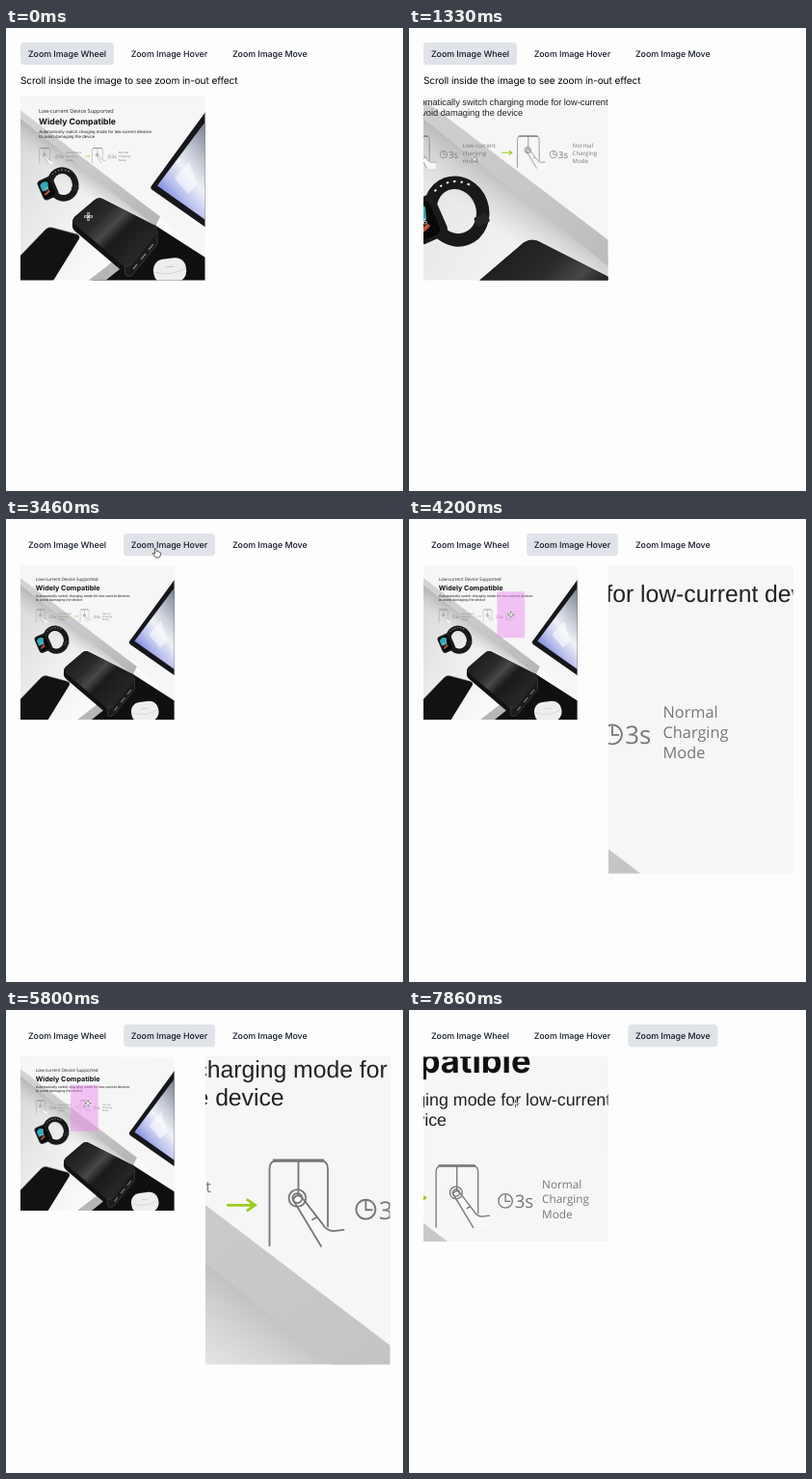
Animation, 412 px wide and 480 px high, one loop 8 s. Source, as an HTML page:

```html
<!DOCTYPE html>
<html lang="en">
<head>
<meta charset="utf-8">
<title>Zoom image demo</title>
<style>
  html, body { margin: 0; width: 100%; height: 100%; overflow: hidden; background: #fdfdfd; }
  #stage { display: block; width: 412px; height: 480px; text-rendering: geometricPrecision; }
  .tab { fill: #e0e3e8; }
  .label { font: 500 8.85px Inter, sans-serif; letter-spacing: -.005em; fill: #111827; }
  .hint { font: 10.08px Inter, sans-serif; letter-spacing: -.01em; fill: #000; }
  .small { font: 2.94px "Open Sans", sans-serif; fill: #777; }
  .body { font: 4.47px "Liberation Sans", Arial, sans-serif; fill: #222; }
  .line { fill: none; stroke: #777; stroke-width: .33; }
</style>
</head>
<body>
<svg id="stage" viewBox="0 0 412 480">
  <defs>
    <linearGradient id="desk" x2="1" y2=".6">
      <stop stop-color="#d2d2d3"/><stop offset=".35" stop-color="#e9e9ea"/><stop offset=".7" stop-color="#fafafa"/>
    </linearGradient>
    <linearGradient id="ledge" x2="1" y2="1">
      <stop stop-color="#d4d4d4"/><stop offset=".6" stop-color="#c6c6c6"/><stop offset="1" stop-color="#b4b4b4"/>
    </linearGradient>
    <linearGradient id="shade" gradientUnits="userSpaceOnUse" x1="70" y1="76" x2="55" y2="96">
      <stop stop-color="#a8a8a8" stop-opacity=".75"/><stop offset="1" stop-color="#c8c8c8" stop-opacity="0"/>
    </linearGradient>
    <linearGradient id="screen" x1=".9" x2=".3" y2="1">
      <stop stop-color="#7d8693"/><stop offset=".3" stop-color="#c3c9d4"/><stop offset=".5" stop-color="#f0f1f6"/>
      <stop offset=".72" stop-color="#b9c0ee"/><stop offset="1" stop-color="#5a66cf"/>
    </linearGradient>
    <linearGradient id="shell" x2="1" y2=".8">
      <stop stop-color="#161616"/><stop offset=".35" stop-color="#2b2b2b"/><stop offset=".48" stop-color="#484848"/><stop offset=".6" stop-color="#1b1b1b"/><stop offset="1" stop-color="#2c2c2c"/>
    </linearGradient>

    <g id="step">
      <path class="line" d="M74.4 70.5V56q0-1.5 1.5-1.5h7.9q1.5 0 1.5 1.5V68M79.8 54.5V61"/>
      <path d="M75 54.5h9.6" stroke="#777" stroke-width=".6"/>
      <path d="M78.8 61.8q.8-1.6 2 0l3.6 4.9 4 .9v3.2h-4.2z" fill="#f8f8f8"/>
      <path class="line" d="M84.1 70.6l-5.3-8.8q.8-1.6 2 0l3.4 4.4q1 1.7 2.6 1.4l1.6-.2M82.3 65.6l.9-.5"/>
      <circle class="line" cx="79.6" cy="61.5" r="1.6"/><circle class="line" cx="79.6" cy="61.5" r=".9"/>
      <circle class="line" cx="92.4" cy="63.6" r="1.8"/><path class="line" d="M92.4 62v1.7h1.3"/>
      <text class="small" x="94.8" y="65.4" style="font-size:4.65px">3s</text>
    </g>

    <g id="art">
      <rect width="192" height="192" fill="url(#desk)"/>
      <path d="M0 20L140 130l-30 40L0 85z" fill="url(#shade)"/>
      <path d="M0 0H192V170L143 124 0 15.4z" fill="#f6f6f7"/>
      <path d="M0 15.4L145 125.5l-5 10L0 24z" fill="url(#ledge)"/>
      <path d="M139 134l53 34v24H74z" fill="#101011"/>
      <path d="M70 192l38-29 10 5-30 24z" fill="#b6b6b7"/>

      <path d="M136 93.5L192 17v119.5l-55-38.5q-3-2-1-4.5z" fill="#16171a"/>
      <path d="M142 93.5L192 27v102z" fill="url(#screen)"/>
      <path d="M160 86l15-17 8 24-9 9z" fill="#fff" opacity=".55"/>

      <text x="19" y="18.3" style="font:5.5px 'Open Sans',sans-serif" fill="#222">Low-current Device Supported</text>
      <text x="19" y="30.4" style="font:700 8.65px Inter,sans-serif" fill="#111">Widely Compatible</text>
      <text class="body" x="19.2" y="38.9">Automatically switch charging mode for low-current devices</text>
      <text class="body" x="19.2" y="44.2">to avoid damaging the device</text>
      <use href="#step" x="-54.8"/><use href="#step"/>
      <g class="small">
        <text x="47" y="60.4">Low-current</text><text x="47" y="64.2">charging</text><text x="47" y="68">mode</text>
        <text x="101.9" y="60.4">Normal</text><text x="101.9" y="64.2">Charging</text><text x="101.9" y="68">Mode</text>
      </g>
      <path d="M66.4 62.8h5.2m-1.5-1.1 1.6 1.1-1.6 1.1" fill="none" stroke="#9ccc1f" stroke-width=".5"/>

      <ellipse cx="44" cy="92" rx="13" ry="14.5" fill="none" stroke="#19191a" stroke-width="6.5" transform="rotate(-20 44 92)"/>
      <path d="M33 82q8-8 18-3" fill="none" stroke="#e8e8e8" stroke-width="1" stroke-dasharray="1.2 2.4"/>
      <rect x="53" y="94" width="7" height="5" rx="1" fill="#252526" transform="rotate(-25 56 96)"/>
      <g transform="rotate(-24 29 96)">
        <rect x="20" y="85" width="17" height="22" rx="4" fill="#1a1b1d"/>
        <rect x="21.5" y="87" width="12" height="18" rx="3" fill="#070809"/>
        <path d="M22 90q5-4 9 0l-2 6-7 1z" fill="#36a9b7"/>
        <path d="M23 101l6-2" stroke="#c75442" stroke-width="2"/>
        <text x="24" y="98" fill="#fff" style="font:4px Inter,sans-serif">08</text>
      </g>

      <path d="M0 166l26-27q3-3 7-2l26 7q4 2 1 6L34 192H0z" fill="#121214"/>
      <path d="M0 166l26-27q3-3 7-2l26 7" fill="none" stroke="#555" stroke-width=".6"/>

      <path d="M56 126l20-17q4-4 9-2l55 28q4 2 3 6l-1 14q0 3-3 5l-22 24q-4 4-8 1L57 141q-4-3-3-9 0-4 2-6z" fill="#111"/>
      <path d="M56 126l20-17q4-4 9-2l55 28q4 2 0 6l-26 34q-4 4-8 1L56 133q-3-3 0-7z" fill="url(#shell)"/>
      <path d="M108 177q4 1 7-2l27-35v14l-25 31q-4 4-8 1z" fill="#1b1b1c" stroke="#555" stroke-width=".6"/>
      <path d="M117 180l4-5m4-5 5-6m3-4 5-6" stroke="#777" stroke-width="1.5"/>

      <g transform="rotate(-7 155 181)">
        <rect x="138" y="169" width="34" height="25" rx="11" fill="#eeeeef"/>
        <path d="M139 181q16 7 32 0" fill="none" stroke="#c4c4c6" stroke-width=".6"/>
        <rect x="151" y="177" width="9" height="1" fill="#c8c8ca"/>
      </g>
    </g>
  </defs>

  <rect width="412" height="480" fill="#fdfdfd"/>
  <rect class="tab" x="15" y="15" width="97" height="23.3" rx="4"/>
  <rect class="tab" x="122" y="15" width="95" height="23.3" rx="4"/>
  <rect class="tab" x="227.3" y="15" width="93" height="23.3" rx="4"/>
  <g class="label">
    <text x="23" y="30">Zoom Image Wheel</text>
    <text x="129.7" y="30">Zoom Image Hover</text>
    <text x="235" y="30">Zoom Image Move</text>
  </g>
  <text class="hint" id="hint" x="15" y="58.4">Scroll inside the image to see zoom in-out effect</text>
  <svg id="photo" x="15"><use href="#art"/></svg>
  <rect id="lens" width="28.7" height="47.9" fill="#ee82ee" opacity=".45"/>
  <svg id="panel" x="207" y="48.5" width="191.5" height="319"><use href="#art"/></svg>

  <g id="cross" fill="none">
    <path d="M-4.5 0h9M0-4.5v9" stroke="#fff" stroke-width="2"/>
    <path d="M-4 0h3M1 0h3M0-4v3M0 1v3" stroke="#333" stroke-width=".8"/>
  </g>
  <path id="hand" d="M-1.8-4.5q1-.8 1.6.4l.6 2.6q1.2-.6 1.8.4 1.1-.4 1.4.6 1-.1 1 1.1l-.4 2.2-1 2h-4l-2.6-3.4q-.8-1.3.6-1.2l1.5 1z" fill="#fff" stroke="#333" stroke-width=".8"/>
</svg>

<script>
  const LOOP = 8000, SIZE = 191.5, SMALL = 159.6, LEFT = 15, TOP = 48.5;
  const RATIO = SIZE / SMALL, LENS_W = 28.7, LENS_H = 47.9, LENS_LAG = 60;
  const HOVER_AT = 2540, MOVE_AT = 6400;

  // Pointer path: time, x, y
  const path = [
    [0, 85.5, 195.5], [1000, 85.5, 195.5], [1130, 68, 136], [2000, 68, 136],
    [2200, 156, 35], [3460, 156, 35], [4130, 105.8, 99.2], [4530, 105.8, 99.2],
    [4730, 170, 34], [4930, 170, 34], [5530, 81.4, 101.7], [5799, 81.4, 101.7],
    [5800, 85, 97], [6100, 130, 34], [6330, 263, 29], [7130, 263, 29],
    [7860, 110.5, 97], [LOOP, 110.5, 97]
  ];

  const el = id => document.getElementById(id);
  const tabs = document.querySelectorAll('.tab');
  const [hint, photo, lens, panel, cross, hand] =
    ['hint', 'photo', 'lens', 'panel', 'cross', 'hand'].map(el);

  const clamp = (v, lo, hi) => Math.min(hi, Math.max(lo, v));
  const show = (node, on) => node.setAttribute('visibility', on ? 'visible' : 'hidden');
  const set = (node, attrs) => {
    for (const key in attrs) node.setAttribute(key, attrs[key]);
  };

  function pointerAt(time) {
    const t = clamp(time, 0, LOOP - 1);
    const i = path.findIndex(p => p[0] > t);
    const [t0, x0, y0] = path[i - 1], [t1, x1, y1] = path[i];
    const k = (t - t0) / (t1 - t0);
    return { x: x0 + (x1 - x0) * k, y: y0 + (y1 - y0) * k };
  }

  function place(top, size, scale = 1, x = 0, y = 0) {
    const span = SIZE / scale;
    set(photo, { y: top, width: size, height: size, viewBox: `${x / scale} ${y / scale} ${span} ${span}` });
  }

  function wheel(t) {
    const scale = clamp(Math.exp((t - 1130) * 0.00364), 1, 4);
    place(70, SIZE, scale, 53 * (scale - 1), 66 * (scale - 1));
    return true;
  }

  function hover(t, pointer) {
    const within = p => p.y > TOP && p.x < LEFT + SMALL;
    // The enlarged view keeps its last position while the pointer is away.
    const focus = pointerAt(t > 4530 && t < 5080 ? 4500 : t - LENS_LAG);
    const x = clamp(focus.x - LENS_W / 2, LEFT, LEFT + SMALL - LENS_W);
    const y = clamp(focus.y - LENS_H / 2, TOP, TOP + SMALL - LENS_H);
    const inside = within(pointer);
    place(TOP, SMALL);
    set(lens, { x, y });
    set(panel, { viewBox: [(x - LEFT) * RATIO, (y - TOP) * RATIO, LENS_W * RATIO, LENS_H * RATIO].join(' ') });
    show(lens, inside && within(focus));
    show(panel, within(focus));
    return inside;
  }

  function move(t, pointer) {
    const inside = pointer.x < LEFT + SIZE && pointer.y > TOP;
    if (inside) place(TOP, SIZE, 4, 3 * (pointer.x - LEFT) - 2, Math.max(0, 3 * (pointer.y - 62)));
    else place(TOP, SIZE);
    return inside;
  }

  function draw(t) {
    const pointer = pointerAt(t);
    const mode = t < HOVER_AT ? 0 : t < MOVE_AT ? 1 : 2;
    tabs.forEach((tab, i) => show(tab, i === mode));
    show(hint, mode === 0);
    show(lens, false);
    show(panel, false);
    const inside = [wheel, hover, move][mode](t, pointer);
    const onImage = inside && pointer.y > TOP;
    show(cross, onImage);
    show(hand, !onImage);
    for (const node of [cross, hand]) set(node, { transform: `translate(${pointer.x} ${pointer.y})` });
  }

  const start = performance.now();
  function frame() {
    draw((performance.now() - start) % LOOP);
    requestAnimationFrame(frame);
  }
  frame();
</script>
</body>
</html>
```
